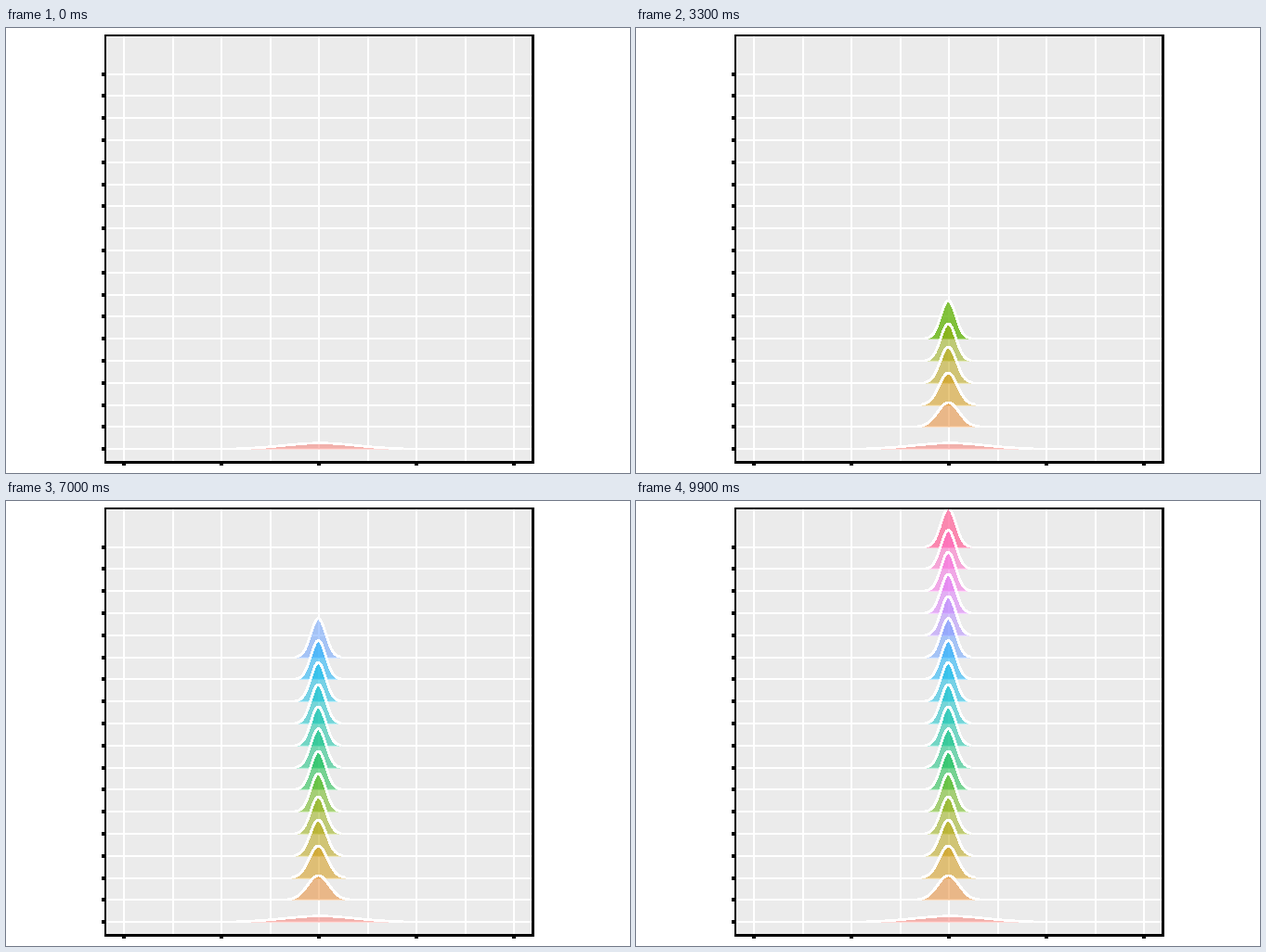
Write a matplotlib script that moves like this. It is 672 by 480 pixels and loops after 10 s.

```python
import numpy as np
import matplotlib.pyplot as plt
from matplotlib.animation import FuncAnimation
from matplotlib.patches import Rectangle

W, H, DPI = 672, 480, 96
N = 18
FRAMES, INTERVAL = 100, 100
PX = 72 / DPI

# evenly spaced hues, one per ridge
COLORS = ["#F8766D", "#E88526", "#D39200", "#B79F00", "#93AA00", "#5EB300",
          "#00BA38", "#00BF74", "#00C19F", "#00BFC4", "#00B9E3", "#00ADFA",
          "#619CFF", "#AE87FF", "#DB72FB", "#F564E3", "#FF61C3", "#FF699C"]
HEIGHTS = [6.4, 26.3, 34.5, 38.7, 40, 41.2, 41.5]
SIGMAS = [38, 11.6, 9.8, 8.7, 8.2]
CUTS = [89, 33.5, 29, 26]

fig = plt.figure(figsize=(W / DPI, H / DPI), dpi=DPI, facecolor="white")
ax = fig.add_axes([0, 0, 1, 1])
ax.set_xlim(0, W)
ax.set_ylim(H, 0)
ax.axis("off")


def pick(values, k, rest):
    return values[k] if k < len(values) else rest


def box(x0, y0, x1, y1, color, z):
    ax.add_patch(Rectangle((x0, y0), x1 - x0, y1 - y0, facecolor=color,
                           linewidth=0, antialiased=False, zorder=z))


def base(k):
    return 454.1 - 23.79 * k


def start(k):
    """Frame at which ridge k appears."""
    if k == 0:
        return 0
    return 6 * k - 1 if k <= 11 else 65 + 5 * (k - 11)


def overlap(k):
    """Frame at which the trace of ridge k is laid over the ridge itself."""
    return start(k + 1) - (2 if k < 11 else 1)


def draw_panel():
    box(107, 8, 567, 468, "#EBEBEB", 0)
    for i in range(9):
        x = int(127 + 52.5 * i + 0.5)
        box(x - 1, 8, x + 1, 468, "white", 1)
        if i % 2 == 0:
            box(x - 2, 469, x + 2, 472, "black", 50)
    for k in range(N):
        y = round(base(k))
        box(107, y - 1, 567, y + 1, "white", 1)
        box(103, y - 2, 106, y + 2, "black", 50)
    for edge in [(106, 7, 108, 470), (566, 7, 569, 470),
                 (106, 7, 569, 9), (106, 467, 569, 470)]:
        box(*edge, "black", 50)


def make_ridge(k):
    mid = 338 if k == 0 else 336.3
    cut = pick(CUTS, k, 24.5)
    x = np.linspace(-cut, cut, 161)
    bell = np.exp(-0.5 * (x / pick(SIGMAS, k, 8.0)) ** 2)
    y = base(k) - pick(HEIGHTS, k, 41.9) * bell
    z = 10 + 2 * (N - k)
    fills = [ax.fill_between(mid + x, y, round(base(k)), color=COLORS[k],
                             alpha=0.5, linewidth=0, antialiased=False,
                             zorder=z / 2) for _ in range(2)]
    line, = ax.plot(mid + x, y, color="white", linewidth=1.7 * PX,
                    antialiased=False, solid_capstyle="butt",
                    zorder=z / 2 + 0.5)
    return fills[0], fills[1], line


draw_panel()
ridges = [make_ridge(k) for k in range(N)]


def update(i):
    for k, (fill, trace, line) in enumerate(ridges):
        shown = i >= start(k)
        fill.set_visible(shown)
        line.set_visible(shown)
        trace.set_visible(overlap(k) <= i < start(k + 1))
    return [a for ridge in ridges for a in ridge]


def reset():
    return update(0)


anim = FuncAnimation(fig, update, frames=FRAMES, init_func=reset,
                     interval=INTERVAL, repeat=True, repeat_delay=0,
                     blit=False)
plt.show()
```
